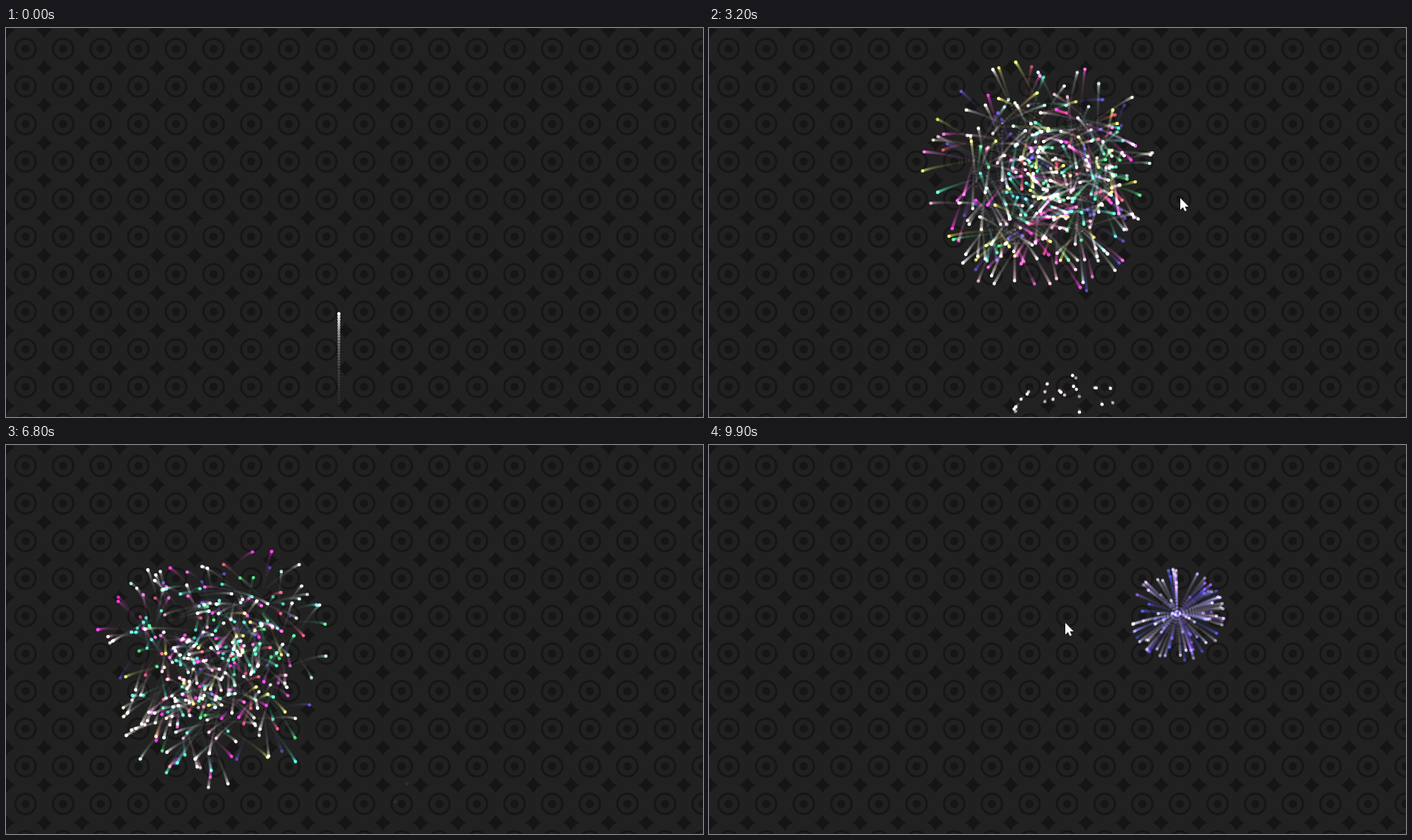
An HTML page with a canvas that plays this animation: 982 by 549 pixels, repeating every 10 s.

```html
<!DOCTYPE html>
<html lang="en">
<head>
<meta charset="utf-8">
<title>Fireworks</title>
<style>
html, body { margin: 0; width: 100%; height: 100%; overflow: hidden; background: #212121; }
canvas { display: block; }
</style>
</head>
<body>
<canvas id="stage" width="982" height="549"></canvas>
<script>
const W = 982, H = 549, LOOP = 10000, STEP = 100;
const TICK = 1000 / 60, TRAIL = 540;
const DRAG = 260, SPREAD = 85, DRIFT = 0.008, FALL = 0.016;
const CLIMB = 0.24, SPLIT = 1750;

const ctx = document.getElementById('stage').getContext('2d');

// x, y and time of each burst, with the colours of its first stars
const bursts = [
  { x: 470, y: 180, at: 930, colors: ['#ffffff', '#e8f8ff', '#7fd8e0', '#4a9ab8', '#bff0f0'] },
  { x: 513, y: 567, at: 1700, colors: ['#ffffff', '#ffe6f4', '#e0b8d0', '#fff4fa'] },
  { x: 301, y: 272, at: 4375, colors: ['#ffffff', '#f0e8ff', '#7a40e8', '#cf40d8', '#5068c0', '#b8a0f0'] },
  { x: 660, y: 238, at: 9554, colors: ['#8a7cc0', '#2a34c0', '#6a3cb8', '#a89cc8', '#9c9cb0'] }
];
const mixed = ['#ffffff', '#ffffff', '#f4fff4', '#fff0e0', '#ff20e0', '#f050d0', '#40e8c0',
  '#38c8b0', '#f4f460', '#f0b0d0', '#40e878', '#e04060', '#b8e8e8', '#4030a0'];

// time, x, y of the pointer
const pointerRuns = [
  [[300, 398, 255], [1100, 539, 255], [1700, 306, 258], [2500, 497, 250], [3200, 664, 240],
   [3900, 662, 236], [4400, 673, 238], [4900, 674, 240]],
  [[7000, 660, 252], [7700, 590, 254], [8400, 545, 249], [9900, 502, 251], [10000, 502, 251]]
];

function seeded(a) {
  return () => {
    a = a + 0x6D2B79F5 | 0;
    let v = Math.imul(a ^ a >>> 15, 1 | a);
    v = v + Math.imul(v ^ v >>> 7, 61 | v) ^ v;
    return ((v ^ v >>> 14) >>> 0) / 4294967296;
  };
}
const rand = seeded(2024);
const pick = list => list[Math.floor(rand() * list.length)];

// A random direction in space, seen from the front
function direction() {
  const z = rand() * 2 - 1, a = rand() * Math.PI * 2, r = Math.sqrt(1 - z * z);
  return [Math.cos(a) * r, Math.sin(a) * r];
}

const reach = age => SPREAD * (1 - Math.exp(-age / DRAG)) + DRIFT * age;
const drop = age => FALL * (age - DRAG * (1 - Math.exp(-age / DRAG)));

const sparks = [];

function addBurst(b) {
  sparks.push({
    born: -1e4, end: b.at, size: 2.3, light: 1, fade: 1, color: '#ffffff',
    pos: t => [b.x - 1, b.y + CLIMB * (b.at - t)]
  });
  for (let i = 0; i < 92; i++) {
    const d = direction(), split = b.at + SPLIT + rand() * 90;
    sparks.push({
      born: b.at, end: split, size: 2.3, light: 0.45 + rand() * 0.55, fade: 1, color: pick(b.colors),
      pos: t => {
        const r = reach(t - b.at);
        return [b.x + d[0] * r, b.y + d[1] * r + drop(t - b.at)];
      }
    });
    if (split > LOOP) continue;
    const r0 = reach(split - b.at);
    for (let k = 0; k < 4; k++) {
      const e = direction();
      sparks.push({
        born: split, end: split + 1100 + rand() * 2250, size: 2.4,
        light: 0.6 + rand() * 0.4, fade: 500, color: pick(mixed),
        pos: t => {
          const r = reach(t - split);
          return [b.x + d[0] * r0 + e[0] * r, b.y + d[1] * r0 + e[1] * r + drop(t - b.at)];
        }
      });
    }
  }
}
bursts.forEach(addBurst);

function disc(c, x, y, r) {
  c.beginPath();
  c.arc(x, y, r, 0, Math.PI * 2);
}

function makeWall() {
  const wall = document.createElement('canvas');
  wall.width = W;
  wall.height = H;
  const c = wall.getContext('2d');
  const eachCell = draw => {
    for (let y = -24; y < H + 53; y += 53)
      for (let x = -26; x < W + 53; x += 53) draw(x + 0.5, y + 0.5);
  };
  c.fillStyle = '#151515';
  c.fillRect(0, 0, W, H);
  c.fillStyle = '#212121';
  eachCell((x, y) => { disc(c, x, y, 30.6); c.fill(); });
  c.fillStyle = c.strokeStyle = '#161616';
  c.lineWidth = 3.2;
  eachCell((x, y) => {
    disc(c, x, y, 14.4);
    c.stroke();
    disc(c, x, y, 5.8);
    c.fill();
  });
  return wall;
}
const wall = makeWall();

function dot(x, y, r, alpha) {
  ctx.globalAlpha = alpha;
  disc(ctx, x, y, r);
  ctx.fill();
}

function drawSpark(s, t) {
  if (t < s.born || t > s.end + TRAIL) return;
  const light = s.light * Math.max(0, Math.min(1, s.fade > 1 ? (s.end - t) / s.fade : 1));
  if (!light) return;
  ctx.fillStyle = s.color;
  let [px, py] = s.pos(t);
  if (t < s.end) dot(px, py, s.size, light);
  for (let age = TICK; age < TRAIL && t - age >= s.born; age += TICK) {
    const [x, y] = s.pos(t - age), gap = Math.hypot(x - px, y - py);
    if (gap < 1) continue;
    px = x;
    py = y;
    if (t - age > s.end) continue;
    const alpha = Math.min(0.8, 0.2 * gap) * Math.exp(-age / 190) * light;
    dot(x, y, s.size * (1 - 0.35 * age / TRAIL), alpha);
  }
}

function drawPointer(t) {
  const run = pointerRuns.find(p => t >= p[0][0] && t < p[p.length - 1][0]);
  if (!run) return;
  const i = run.findIndex(p => p[0] > t);
  const [t0, x0, y0] = run[i - 1], [t1, x1, y1] = run[i];
  const k = (t - t0) / (t1 - t0);
  ctx.save();
  ctx.translate(x0 + (x1 - x0) * k, y0 + (y1 - y0) * k);
  ctx.fillStyle = '#ffffff';
  ctx.strokeStyle = '#111111';
  ctx.lineWidth = 1;
  const arrow = new Path2D('M0 0V16.5L3.8 13L6.4 18.6L9 17.4L6.5 12H11.8Z');
  ctx.stroke(arrow);
  ctx.fill(arrow);
  ctx.restore();
}

function draw(t) {
  ctx.globalCompositeOperation = 'source-over';
  ctx.globalAlpha = 1;
  ctx.drawImage(wall, 0, 0);
  ctx.globalCompositeOperation = 'lighter';
  for (const s of sparks) drawSpark(s, t);
  ctx.globalCompositeOperation = 'source-over';
  ctx.globalAlpha = 1;
  drawPointer(t);
}

const start = performance.now();
let shown = -1;
function tick() {
  const t = Math.floor((performance.now() - start) % LOOP / STEP) * STEP;
  if (t !== shown) draw(shown = t);
  requestAnimationFrame(tick);
}
tick();
</script>
</body>
</html>
```
